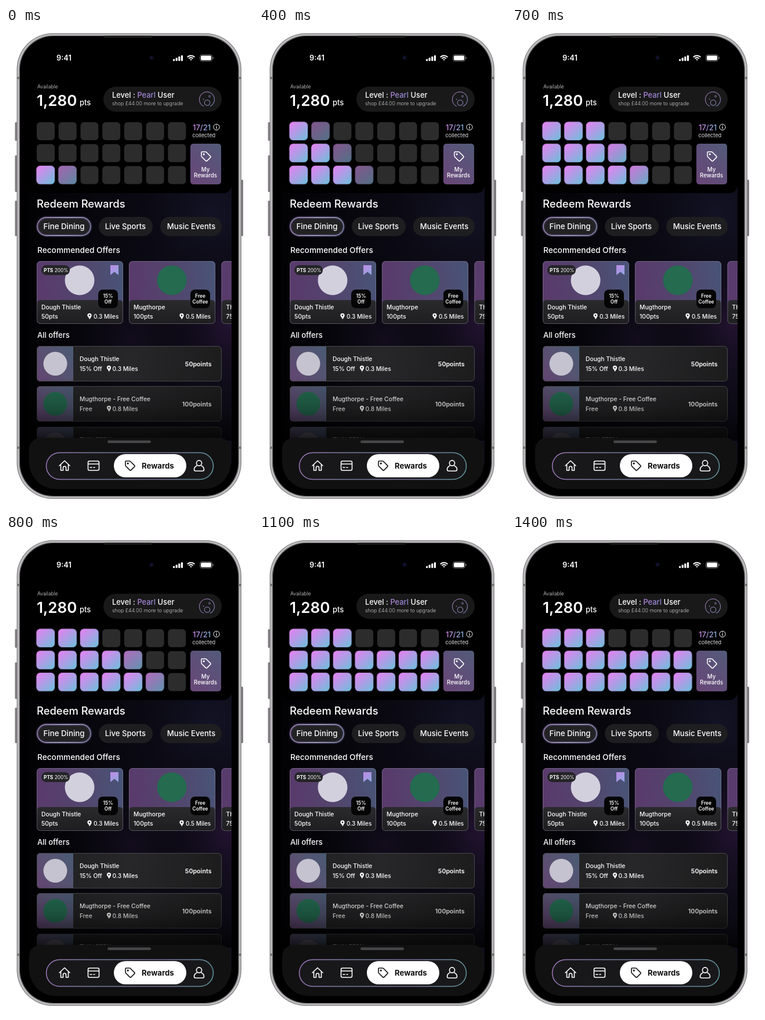
These frames come from a looping animation (426 px wide and 824 px high, 1.5 s). An HTML page with a canvas:

```html
<!DOCTYPE html>
<html lang="en">
<head>
<meta charset="utf-8">
<title>Rewards</title>
<style>
  html, body { margin: 0; width: 100%; height: 100%; overflow: hidden; background: #fff; }
  canvas { display: block; width: 426px; height: 824px; }
</style>
</head>
<body>
<canvas id="stage"></canvas>
<script>
const W = 426, H = 824, LOOP = 1500, STEP = 100, FADE = 120;
const canvas = document.getElementById('stage');
const ctx = canvas.getContext('2d');
const ratio = window.devicePixelRatio || 1;
canvas.width = W * ratio;
canvas.height = H * ratio;

// Fade-in start of each lit tile, in ms, per row from top to bottom.
const tileStarts = [
  [210, 350, 580],
  [0, 200, 350, 595, 720, 805, 950],
  [-200, -70, 200, 350, 600, 720, 830]
];

const icons = {
  tag: new Path2D('M-8-7Q-8-8-7-8H-1Q0-8 .7-7.3L7.6-.4Q8.6.6 7.6 1.6L1.6 7.6Q.6 8.6-.4 7.6L-7.3.7Q-8 0-8-1ZM-4.6-3.8a.8.8 0 1 0 0-.01'),
  home: new Path2D('M-9 0L0-8.5L9 0M-6.5-2V8H-2.5V3.5Q-2.5 1 0 1T2.5 3.5V8H6.5V-2'),
  card: new Path2D('M-7-8H7Q9.5-8 9.5-5.5V5.5Q9.5 8 7 8H-7Q-9.5 8-9.5 5.5V-5.5Q-9.5-8-7-8ZM-9-3H9M-6 3H-3M0 3H2'),
  user: new Path2D('M-4.6-4.5a4.6 4.6 0 1 0 9.2 0a4.6 4.6 0 1 0-9.2 0M-4 0C-7 1.5-8.5 4-8.5 6.5Q-8.5 9-6 9H6Q8.5 9 8.5 6.5C8.5 4 7 1.5 4 0'),
  pin: new Path2D('M0 5.2C-2-.3-3.6.5-3.6-1.6A3.6 3.6 0 0 1 3.6-1.6C3.6.5 2 2 0 5.2ZM1.3-1.6a1.3 1.3 0 1 0-2.6 0a1.3 1.3 0 1 0 2.6 0')
};

function grad(x0, y0, x1, y1, ...colors) {
  const g = ctx.createLinearGradient(x0, y0, x1, y1);
  colors.forEach((c, i) => g.addColorStop(i / (colors.length - 1), c));
  return g;
}

function box(x, y, w, h, r, fill, stroke, line = 1) {
  ctx.beginPath();
  ctx.roundRect(x, y, w, h, r);
  if (fill) { ctx.fillStyle = fill; ctx.fill(); }
  if (stroke) { ctx.strokeStyle = stroke; ctx.lineWidth = line; ctx.stroke(); }
}

function disc(x, y, r, fill, stroke, line = 1) {
  box(x - r, y - r, 2 * r, 2 * r, r, fill, stroke, line);
}

function text(str, x, y, size, weight = 400, color = '#fff', align = 'left') {
  ctx.font = `${weight} ${size}px Inter, "Open Sans", sans-serif`;
  ctx.textAlign = align;
  ctx.fillStyle = color;
  ctx.fillText(str, x, y);
  return x + ctx.measureText(str).width;
}

function icon(name, x, y, color, line = 1.5) {
  ctx.save();
  ctx.translate(x, y);
  ctx.lineWidth = line;
  ctx.lineJoin = ctx.lineCap = 'round';
  ctx.strokeStyle = ctx.fillStyle = color;
  if (line) ctx.stroke(icons[name]);
  else ctx.fill(icons[name], 'evenodd');
  ctx.restore();
}

function glow(x, y, r, color) {
  const g = ctx.createRadialGradient(x, y, 0, x, y, r);
  g.addColorStop(0, color);
  g.addColorStop(1, 'rgba(0,0,0,0)');
  ctx.fillStyle = g;
  ctx.fillRect(x - r, y - r, 2 * r, 2 * r);
}

function drawPhone() {
  for (const [y, h] of [[162, 32], [219, 63], [297, 61]]) box(15.5, y, 4, h, 1.5, '#7d7b7d');
  box(404, 261, 5, 97, 1.5, '#7d7b7d');
  box(18.5, 9, 387.5, 801, 62, '#8a888a');
  box(20, 10.5, 384.5, 798, 60.5, '#c2c0c2');
  box(22.5, 12.8, 379.5, 793.4, 58.5, '#6f6d70');
  box(24, 14, 376.5, 791, 57.5, '#000');
  ctx.fillStyle = '#777';
  for (const y of [84, 720]) {
    ctx.fillRect(19, y, 4, 4);
    ctx.fillRect(402, y, 4, 4);
  }
  box(169, 13.5, 83, 3.5, 1.7, '#171717');
}

function drawStatusBar() {
  text('9:41', 87, 56, 12.8, 600);
  glow(251, 51, 6, '#20205a');
  for (let i = 0; i < 4; i++) box(288 + i * 4.6, 53.5 - i * 2.2, 3.2, 3.2 + i * 2.2, 1, '#fff');
  ctx.strokeStyle = '#fff';
  ctx.lineWidth = 2;
  ctx.lineCap = 'butt';
  for (const r of [1.5, 5, 8.6]) {
    ctx.beginPath();
    ctx.arc(319, 56, r, -Math.PI * 0.76, -Math.PI * 0.24);
    ctx.stroke();
  }
  box(334.5, 46, 21, 11, 3.5, '#000', '#777');
  box(336, 47.5, 18, 8, 2, '#fff');
  box(356.5, 49.5, 1.4, 4, 0.7, '#777');
}

function drawBackdrop() {
  ctx.fillStyle = grad(38, 0, 388, 0, '#020204', '#0a0912', '#110f1d');
  ctx.fillRect(38, 250, 351, 500);
  glow(350, 320, 190, 'rgba(22,22,44,.6)');
  glow(385, 510, 160, 'rgba(46,22,62,.6)');
  glow(215, 535, 150, 'rgba(28,17,40,.45)');
  box(38, 70, 351, 214, [0, 0, 14, 14], '#000');
}

function drawHeader() {
  text('Available', 54, 104, 8.6, 300, '#ddd');
  text('1,280', 53, 134, 26, 600);
  text('pts', 127, 133, 13, 500);
  box(168, 101, 204, 43, 21.5, '#19191a');
  let x = text('Level : ', 183, 120, 12.9, 500);
  x = text('Pearl', x, 120, 12.9, 500, grad(x, 0, x + 32, 0, '#b183d8', '#8d88cf'));
  text(' User', x, 120, 12.9, 500);
  text('shop £44.00 more to upgrade', 183, 132.5, 8.8, 300, '#ccc');

  const ring = grad(334, 110, 359, 136, '#93709f', '#7480ab');
  ctx.strokeStyle = ring;
  ctx.lineWidth = 1.2;
  ctx.beginPath();
  ctx.arc(346.5, 123, 13, Math.PI * 0.64, Math.PI * 2.36);
  ctx.stroke();
  disc(347, 128.5, 4.7, null, ring, 1.2);
  disc(351, 117.5, 1.5, null, ring);
  disc(340.5, 122.5, 0.9, ring);
}

function drawTiles(time) {
  for (let row = 0; row < 3; row++) {
    for (let col = 0; col < 7; col++) {
      const x = 53 + col * 37.72, y = 162 + row * 37.8;
      box(x, y, 31, 31, 6, '#2c2c2d');
      const lit = (time - tileStarts[row][col]) / FADE;
      if (!(lit > 0)) continue;
      ctx.save();
      ctx.globalAlpha = Math.min(1, lit);
      ctx.shadowColor = '#57486c';
      ctx.shadowBlur = 2.5 * ratio;
      box(x - 0.5, y - 0.5, 31.5, 31.5, 6.5, grad(x + 2, y + 1, x + 29, y + 31, '#e184f0', '#aa9fe5', '#6fbfdb'));
      ctx.restore();
    }
  }
}

function drawCollected() {
  text('17/21', 322, 176, 13, 500, grad(322, 0, 354, 0, '#d585e8', '#7fb4df'));
  disc(363, 170.5, 5.1, null, '#fff');
  ctx.fillStyle = '#fff';
  ctx.fillRect(362.4, 169.6, 1.2, 3.8);
  ctx.fillRect(362.4, 167.4, 1.2, 1.2);
  text('collected', 321.5, 188, 9.2, 400, '#ddd');
  box(318, 199, 53, 70, 5, grad(318, 262, 371, 205, '#684878', '#5e4f79', '#545a79'));
  icon('tag', 345, 221, '#fff');
  text('My', 344, 247, 9.7, 500, '#fff', 'center');
  text('Rewards', 344, 257, 9.7, 500, '#fff', 'center');
}

function drawChips() {
  text('Redeem Rewards', 53, 309, 18.4, 500);
  ctx.save();
  ctx.shadowColor = '#57486f';
  ctx.shadowBlur = 3 * ratio;
  box(54, 326, 92, 31, 15.5, '#222224', grad(54, 326, 146, 357, '#86709f', '#9796b8', '#72789a'), 1.8);
  ctx.restore();
  box(160, 325, 93, 33, 16.5, '#1e1e20');
  box(266, 325, 106, 33, 16.5, '#1e1e20');
  text('Fine Dining', 100, 346, 13.3, 500, '#fff', 'center');
  text('Live Sports', 206, 346, 13.1, 500, '#fff', 'center');
  text('Music Events', 319.5, 346, 13.1, 500, '#fff', 'center');
}

function drawCard(x, name, points, miles, badge, logo) {
  box(x, 401, 149, 108, 6, grad(x, 430, x + 149, 415, '#593a6c', '#53456d', '#485477'));
  if (logo) disc(x + 74, 434, 25.5, logo);
  box(x, 468, 149, 41, 6, grad(0, 468, 0, 509, '#2a2a2d', '#1e1e20'));
  box(x + 0.5, 401.5, 148, 107, 6, null, 'rgba(150,145,165,.45)');
  text(name, x + 8, 484, 10.3, 500);
  text(points, x + 8, 500, 10.5, 500);
  icon('pin', x + 91, 496, '#fff', 0);
  text(miles, x + 98, 500, 10, 500);
  if (badge) {
    box(x + 106, 450, 34, 32, 8, '#050506');
    text(badge[0], x + 123, 464, 8.3, 600, '#fff', 'center');
    text(badge[1], x + 123, 474, 8.3, 600, '#fff', 'center');
  }
}

function drawCards() {
  text('Recommended Offers', 54, 387, 13.7, 500);
  drawCard(53, 'Dough Thistle', '50pts', '0.3 Miles', ['15%', 'Off'], '#d3d0de');
  drawCard(212, 'Mugthorpe', '100pts', '0.5 Miles', ['Free', 'Coffee'], '#246b50');
  drawCard(371.5, 'THIN FERN', '75pts', '0.9 Miles');
  box(61, 408, 49, 17, 8.5, '#242427');
  const x = text('PTS', 65, 419.5, 8.3, 700);
  text(' 200%', x, 419.5, 8.3, 400);
  ctx.fillStyle = grad(180, 408, 194, 425, '#c08ae6', '#8fa8e2');
  ctx.fill(new Path2D('M180 408H194V425L187 419.5L180 425Z'));
}

function drawRow(y, name, deal, miles, points, logo) {
  box(53, y, 319, 61, 6, grad(53, y, 372, y + 61, '#202022', '#272729', '#1c1c1d'));
  box(53, y, 63, 61, [6, 0, 0, 6], grad(53, y + 50, 116, y + 5, '#624672', '#575371', '#4a5a74'));
  disc(85, y + 30.5, 20.5, logo);
  box(53.5, y + 0.5, 318, 60, 6, null, '#48484c');
  text(name, 127, y + 26, 10.3, 500);
  text(deal, 127, y + 43, 10.3, 500);
  icon('pin', 177.5, y + 39, '#fff', 0);
  text(miles, 183.5, y + 43, 10.2, 500);
  text(points, 354.5, y + 35, 10.7, 600, '#fff', 'right');
}

function drawOffers() {
  text('All offers', 54, 533, 13, 500);
  drawRow(547, 'Dough Thistle', '15% Off', '0.3 Miles', '50points', '#c5c3d0');
  drawRow(616, 'Mugthorpe - Free Coffee', 'Free', '0.8 Miles', '100points', '#246b50');
  drawRow(686, 'THIN FERN', '', '', '', '#77717f');
  ctx.fillStyle = grad(0, 600, 0, 706, 'rgba(0,0,0,0)', 'rgba(0,0,0,.25)', 'rgba(0,0,0,.76)');
  ctx.fillRect(38, 600, 351, 110);
}

function drawNav() {
  box(40, 705, 348, 88, [20, 20, 46, 46], '#111112');
  box(175, 709.5, 75, 4.5, 2.2, '#464648');
  box(69.5, 730.5, 288, 46, 23, '#18181a', grad(69, 730, 358, 777, '#a077bd', '#75809d', '#7a6e98', '#629b9f'), 1.5);
  box(186, 733, 125, 40, 20, '#fff');
  icon('home', 101, 753, '#fff', 1.6);
  icon('card', 151, 753, '#fff', 1.6);
  icon('tag', 214, 753, '#111', 1.6);
  icon('user', 333, 753, '#fff', 1.6);
  text('Rewards', 234, 757.5, 13.2, 700, '#111');
}

function draw(time) {
  ctx.setTransform(ratio, 0, 0, ratio, 0, 0);
  ctx.fillStyle = '#fff';
  ctx.fillRect(0, 0, W, H);
  drawPhone();
  ctx.save();
  ctx.beginPath();
  ctx.roundRect(38, 27, 351, 768, 46);
  ctx.clip();
  drawBackdrop();
  drawStatusBar();
  drawHeader();
  drawTiles(time);
  drawCollected();
  drawChips();
  drawCards();
  drawOffers();
  drawNav();
  ctx.restore();
}

const start = performance.now();
function tick() {
  const elapsed = Math.max(0, performance.now() - start) % LOOP;
  draw(Math.floor(elapsed / STEP) * STEP);
  requestAnimationFrame(tick);
}
tick();
</script>
</body>
</html>
```
